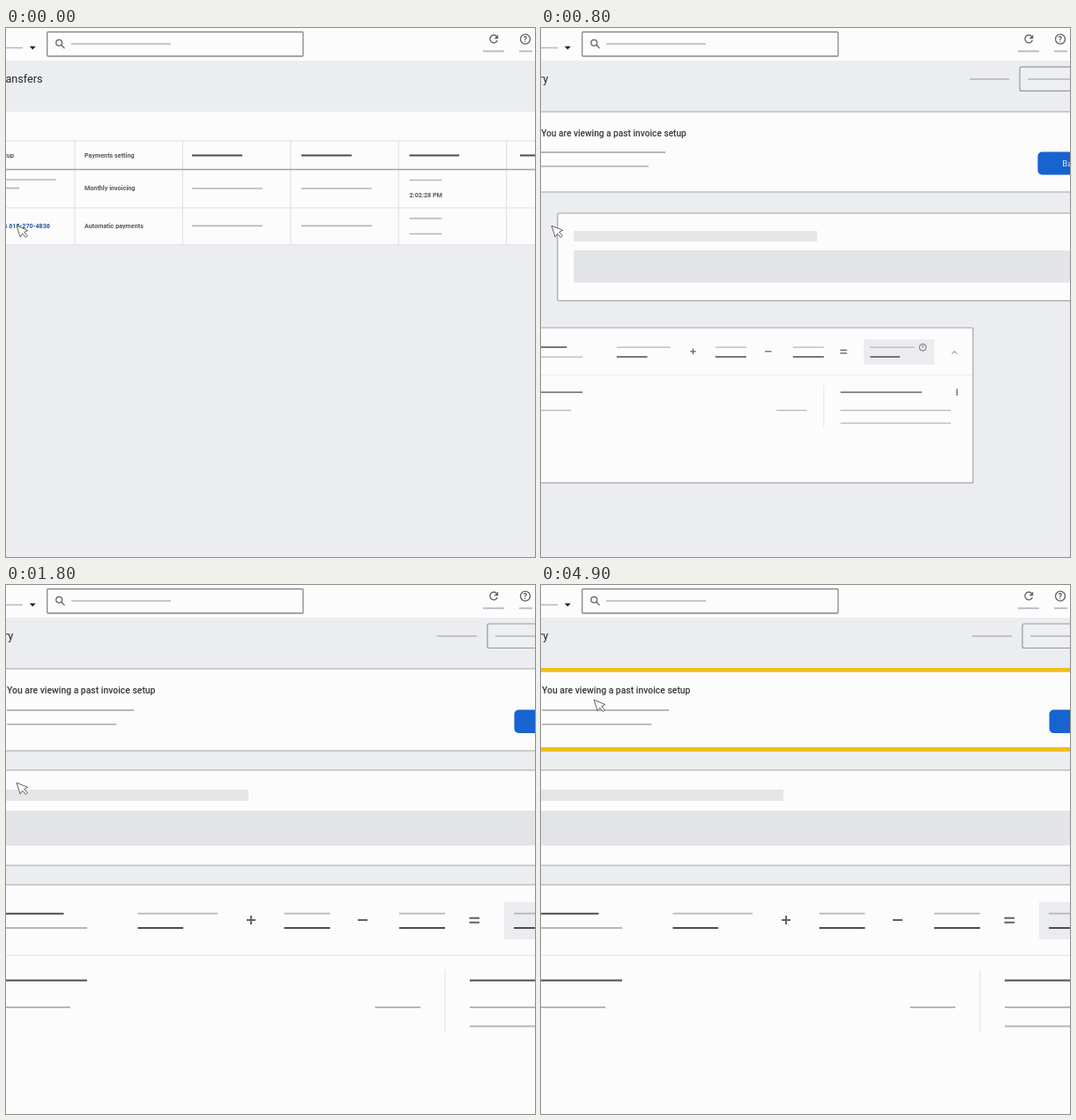
An HTML page that plays this animation: 600x600 px, repeating every 5 s.

```html
<!DOCTYPE html>
<html lang="en">
<head>
<meta charset="utf-8">
<title>Invoice setup</title>
<style>
  html, body { margin: 0; width: 100%; height: 100%; overflow: hidden; background: #ecedf1; }
  svg { display: block; width: 100vw; height: 100vh; }
  text { font-family: Roboto, "Open Sans", sans-serif; fill: #57585b; }
  .title { font-size: 12.6px; fill: #242528; text-anchor: end; }
  .cell { font-size: 7.2px; font-weight: 600; }
  .panel { fill: #fcfcfd; stroke: #a2a3a6; stroke-width: 1.2; vector-effect: non-scaling-stroke; }
  .icon { fill: none; stroke: #606165; stroke-width: 1.3; }
</style>
</head>
<body>
<svg viewBox="0 0 600 600">
  <rect width="600" height="600" fill="#ecedf1"/>

  <g id="table">
    <text class="title" x="41.5" y="62">Transfers</text>
    <rect y="95" width="600" height="151" fill="#fcfcfd"/>
    <g id="grid"></g>
    <text class="cell" x="9" y="147" text-anchor="end">Setup</text>
    <text class="cell" x="89" y="147">Payments setting</text>
    <text class="cell" x="89" y="184">Monthly invoicing</text>
    <text class="cell" x="89" y="227">Automatic payments</text>
    <text class="cell" x="457.5" y="192">2:02:28 PM</text>
    <text class="cell" x="50" y="227" text-anchor="end" style="fill:#2a5798">Payments 615-270-4836</text>
  </g>

  <g id="header">
    <text class="title" x="8.3" y="62">History</text>
    <rect x="546" y="44" width="180" height="27.5" rx="2" fill="#eeeff2" stroke="#96979a" stroke-width="1.2"/>
  </g>

  <g id="banner">
    <rect class="panel" x="-38" y="95" width="1587" height="93"/>
    <text x="1" y="123.2" style="font-size:10.4px;font-weight:500;fill:#37383b">You are viewing a past invoice setup</text>
    <rect x="576.5" y="141.5" width="150" height="26.5" rx="5" fill="#1763d0"/>
    <text x="605" y="158" style="font-size:9.7px;fill:#e8f0fc">Back to current setup</text>
  </g>

  <g id="notice">
    <rect class="panel" x="-45" y="210" width="1594" height="108" rx="2"/>
    <rect x="-25" y="232" width="300" height="12.8" fill="#e5e5e8"/>
    <rect x="-25" y="256" width="1554" height="39.5" fill="#e3e4e8"/>
  </g>

  <g id="summary">
    <rect class="panel" x="-45.5" y="340" width="794.5" height="261" rx="2"/>
    <rect x="565" y="359.5" width="119" height="42.5" fill="#ebecef"/>
    <path d="M-45 420H748M498 436V508" stroke="#e4e5e8" stroke-width="1.2"/>
    <path d="M273 380h10M278 375v10M399 380h11M525.5 377.7h11.5M525.5 382.7h11.5" stroke="#606165" stroke-width="1.9"/>
    <path class="icon" d="M713.5 384l4.5-4.5l4.5 4.5" stroke-width="1.8"/>
    <circle class="icon" cx="664.5" cy="373" r="5.8"/>
    <text x="664.5" y="376.2" text-anchor="middle" font-size="9">?</text>
    <path d="M722 443v3m0 1v3m0 1v3" stroke="#606165" stroke-width="2.4"/>
  </g>

  <path id="mark" fill="none" stroke="#f0be17" stroke-width="4.6" d="M-45 186.4H1549V96.4H-45"/>

  <g id="top">
    <rect width="600" height="37" fill="#fcfcfd"/>
    <path d="M26.7 20.8h7l-3.5 3.8z" fill="#222"/>
    <rect x="46.7" y="4.5" width="290.3" height="27.5" rx="1" fill="#fcfcfd" stroke="#86878a" stroke-width="1.3"/>
    <circle class="icon" cx="60.2" cy="16.8" r="3.4"/>
    <path class="icon" d="M62.7 19.3l3.8 3.8"/>
    <path class="icon" d="M556.7 9.6A4.4 4.4 0 1 0 557.4 14"/>
    <path d="M558.2 7.6v4.6h-4.6z" fill="#606165"/>
    <circle class="icon" cx="589" cy="12.6" r="5.5"/>
    <text x="589" y="15.8" text-anchor="middle" font-size="8.6" font-weight="600">?</text>
  </g>

  <path id="cursor" d="M0 0L4.2 12.8L6.7 8.9L10.4 13.3L12.4 11.6L8.7 7.2L12.8 5.2Z"
        fill="#fcfcfd" stroke="#606165" stroke-width="1" stroke-linejoin="round"/>
</svg>
<script>
const NS = 'http://www.w3.org/2000/svg';
const $ = id => document.getElementById(id);
const LIGHT = '#b6b7ba', DARK = '#4c4d51', RULE = '#dfe0e4';
const LOOP = 5000, TICK = 100;

function lines(id, color, width, d) {
  const p = document.createElementNS(NS, 'path');
  p.setAttribute('d', d);
  p.setAttribute('stroke', color);
  p.setAttribute('stroke-width', width);
  p.setAttribute('fill', 'none');
  $(id).append(p);
}

lines('grid', RULE, 1.1, 'M0 128H600M0 204H600M0 246H600' +
  [0, 1, 2, 3, 4].map(i => `M${78 + i * 122.4} 128V246`).join(''));
lines('grid', '#a0a1a4', 1.6, 'M0 160.5H600');
lines('grid', DARK, 1.8, 'M211 144.5h57M335 144.5h57M457.5 144.5h56.5M583 144.5h57');
lines('grid', LIGHT, 1.7, 'M0 172H57M0 181.7H15M457.5 172.5h37M457.5 216h37M457.5 233.5h37' +
  [182, 224.3].map(y => `M211 ${y}h80M335 ${y}h80`).join(''));
lines('header', LIGHT, 1.7, 'M489 58H534M555 58H700');
lines('banner', LIGHT, 1.8, 'M1 142H145M1 158.2H125.5');
lines('summary', LIGHT, 1.8, 'M-25 389H92M149.5 372.7H240M315.5 372.7h52M446 372.7h52M576 372.7h75' +
  'M-25 479H73M418.5 479H470M526 479H712M526 500.5H712');
lines('summary', DARK, 2, 'M-25 372.7H65.5M149.5 389H201M315.5 389h52M446 389h52M576 389h50' +
  'M-25 448.5H92M526 448.5H663');
lines('top', LIGHT, 1.7, 'M0 22.5H19M74 18H187M541 26.3H565M582 26.3H597');

// Each panel grows from its own anchor, one after another.
const panels = [
  { id: 'header',  x: -38,   y: 58,  start: 75 },
  { id: 'banner',  x: -38,   y: 95,  start: 250 },
  { id: 'notice',  x: 752,   y: 210, start: 425 },
  { id: 'summary', x: -45.6, y: 340, start: 600 }
];
const grow = [[0, 0], [100, .25], [175, .57], [200, .674], [275, .815], [350, .892], [375, .92],
  [450, .95], [525, .973], [600, .99], [725, .995], [775, .998], [900, 1]];
const stroke = [[3550, 0], [3600, 258], [3700, 740], [4100, 2639], [4200, 2980], [4300, 3180], [4400, 3278]];
const glide = [[2900, 0], [3000, .04], [3100, .12], [3300, .33], [3500, .53], [3700, .664],
  [4000, .79], [4300, .875], [4700, .96], [4900, 1]];

function at(keys, t) {
  if (t <= keys[0][0]) return keys[0][1];
  for (let i = 1; i < keys.length; i++) {
    const [t0, a] = keys[i - 1], [t1, b] = keys[i];
    if (t <= t1) return a + (b - a) * (t - t0) / (t1 - t0);
  }
  return keys[keys.length - 1][1];
}

const show = (el, on) => el.setAttribute('visibility', on ? 'visible' : 'hidden');

function draw(t) {
  const opened = t >= 200;
  show($('table'), !opened);
  for (const { id, x, y, start } of panels) {
    const s = at(grow, t - start);
    show($(id), opened && s > 0);
    if (s > 0) $(id).setAttribute('transform', `translate(${x} ${y}) scale(${s}) translate(${-x} ${-y})`);
  }
  const len = at(stroke, t);
  show($('mark'), len > 0);
  $('mark').setAttribute('stroke-dasharray', `${len} 5000`);
  const p = at(glide, t);
  $('cursor').setAttribute('transform', `translate(${12 + 48 * p} ${224.3 - 94 * p})`);
}

const began = performance.now();
function tick() {
  const t = (performance.now() - began) % LOOP;
  draw(Math.floor(t / TICK) * TICK);
  requestAnimationFrame(tick);
}
tick();
</script>
</body>
</html>
```
